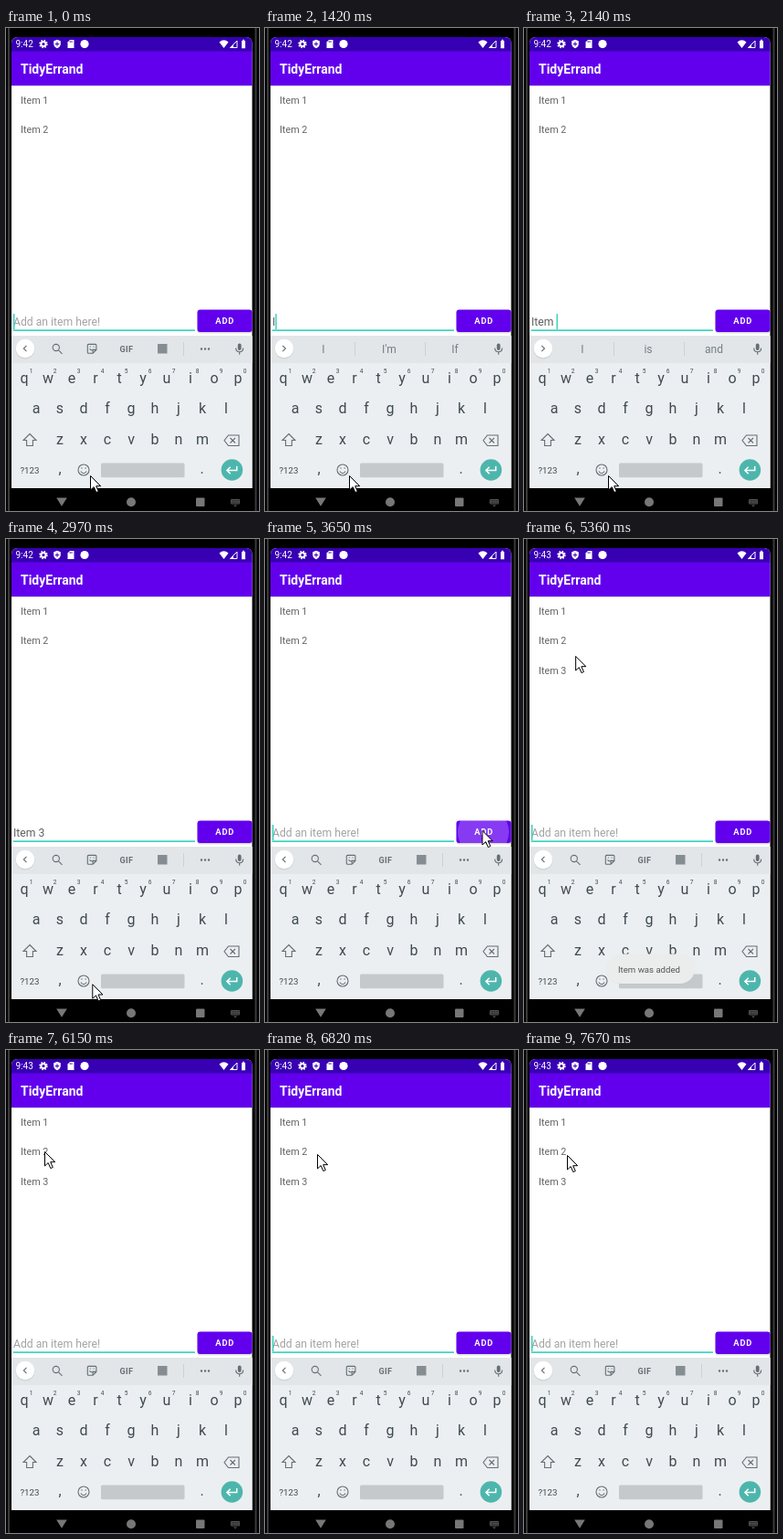
Write an HTML page that moves like this. It is 277x529 px and loops after 8 s.

```html
<!DOCTYPE html>
<html lang="en">
<head>
<meta charset="utf-8">
<style>
html, body { margin: 0; width: 100%; height: 100%; overflow: hidden; background: #000; }
svg { display: block; width: 100vw; height: 100vh; }
text { font-family: Roboto, Arial, sans-serif; white-space: pre; }
.mid { text-anchor: middle; }
.line { fill: none; stroke: #656f74; stroke-width: 1.1; }
.thin { fill: none; stroke: #cdd1d4; stroke-width: 1; }
</style>
</head>
<body>
<svg viewBox="0 0 277 529">
  <defs>
    <clipPath id="screen"><path d="M6 504V17q0-7 7-7H262.5q7 0 7 7V504z"/></clipPath>
    <clipPath id="buttonClip"><rect x="209.5" y="308.5" width="60" height="24.5" rx="3"/></clipPath>
  </defs>

  <!-- Phone and app -->
  <rect width="277" height="529"/>
  <path d="M3 0V529M273.5 0V529" stroke="#3a3a3a" stroke-width="2"/>
  <g clip-path="url(#screen)">
    <rect x="6" y="10" width="264" height="494" fill="#fff"/>
    <rect x="6" y="10" width="264" height="16" fill="#3700b3"/>
    <rect x="6" y="25.5" width="264" height="37.5" fill="#6200ee"/>
    <rect x="6" y="63" width="264" height="1" opacity=".1"/>
    <rect x="6" y="337" width="264" height="167" fill="#eceff1"/>
    <rect x="6" y="337" width="264" height="30" fill="#e2e6e9"/>
  </g>
  <text x="16" y="50" font-size="14" font-weight="700" fill="#fff">TidyErrand</text>

  <!-- Status bar -->
  <g fill="#fff">
    <text id="clock" x="10.5" y="21.3" font-size="10"></text>
    <circle cx="41" cy="17.5" r="2.6" fill="none" stroke="#fff" stroke-width="2"/>
    <circle cx="41" cy="17.5" r="4" fill="none" stroke="#fff" stroke-width="1.5" stroke-dasharray="1.6 1.54"/>
    <path d="M56 12.8l3.8 1.5v3q0 3.4-3.8 5q-3.8-1.6-3.8-5v-3z"/>
    <path d="M56 15.2v4.6M53.8 17.5h4.4" stroke="#3700b3"/>
    <path d="M70 13h4.5v9h-7v-6.5z"/>
    <path d="M70.2 14v2M72 14v2" stroke="#3700b3" stroke-width=".8"/>
    <circle cx="86" cy="17.5" r="4.6"/>
    <path d="M233.5 15.5q5-4.4 10 0l-5 6.5z"/>
    <path d="M253 14v7.5h-7.5z" fill="none" stroke="#fff"/>
    <path d="M249 18v3.5h-3.5z"/>
    <path d="M258 14h1v-1.2h2V14h1v8.2h-4z"/>
  </g>

  <g id="items" fill="#666"></g>

  <!-- Entry row -->
  <text id="entry" x="8" y="326" font-size="12.2"></text>
  <rect x="8" y="330.3" width="199" height="1.7" fill="#3fd3c2"/>
  <rect id="caret" y="313" width="1.5" height="17" fill="#3fd3c2"/>
  <rect x="209.5" y="309.5" width="60" height="25" rx="3" opacity=".13"/>
  <rect x="209.5" y="308.5" width="60" height="24.5" rx="3" fill="#6200ee"/>
  <circle id="ripple" cx="239" cy="321" fill="#fff" clip-path="url(#buttonClip)"/>
  <text x="239.8" y="324.4" class="mid" font-size="9.3" font-weight="700" letter-spacing=".9" fill="#fff">ADD</text>

  <!-- Keyboard -->
  <circle cx="21" cy="352" r="10.5" opacity=".08"/>
  <circle cx="21" cy="351" r="10.2" fill="#fff"/>
  <path id="chevron" class="line"/>
  <g id="tools">
    <circle class="line" cx="54.8" cy="350" r="3.6"/>
    <path class="line" d="M57.5 352.8l4 4"/>
    <path class="line" d="M90.3 346.4h7.6q1 0 1 1v5l-3.8 3.8h-4.8q-1 0-1-1v-7.8q0-1 1-1zM98.9 352.4h-3.8v3.8M91.5 351.2q1.4 2.3 3.4 1.3M91.8 349h1M95.6 349h1"/>
    <text x="132" y="354.5" class="mid" font-size="9" font-weight="700" letter-spacing=".4" fill="#656f74">GIF</text>
    <rect x="166" y="346" width="10.5" height="10.5" fill="#858d92"/>
    <path class="thin" d="M194.5 344v15"/>
    <path d="M214 351.5h.01M218 351.5h.01M222 351.5h.01" stroke="#656f74" stroke-width="2.4" stroke-linecap="round"/>
  </g>
  <g id="words" font-size="12" fill="#757e83" class="mid">
    <path class="thin" d="M98.5 344v15M175.5 344v15"/>
    <text x="64" y="356"></text><text x="136" y="356"></text><text x="208" y="356"></text>
  </g>
  <rect x="253.8" y="345.5" width="3.8" height="7.4" rx="1.9" fill="#656f74"/>
  <path class="line" d="M251.7 350.5q0 4.2 4 4.2t4-4.2M255.7 354.7v3"/>

  <g id="keys" class="mid" fill="#3f4b52"></g>
  <path class="line" d="M26 444.5l7 7h-3.6v6h-6.8v-6H19z"/>
  <path class="line" d="M243.5 446h11.5v11.5h-11.5l-4.5-5.75zM245.5 449l5.5 5.5M251 449l-5.5 5.5"/>
  <circle class="line" cx="85" cy="484" r="6"/>
  <path class="line" d="M81.8 485.5q3.2 4.4 6.4 0M82.2 482h1.5M86.4 482h1.5"/>
  <rect x="104" y="476.4" width="91.5" height="15.8" rx="1.5" fill="#c5c9cc"/>
  <circle cx="247.4" cy="484" r="11.8" fill="#4db6ac"/>
  <path d="M252.7 480v4.5h-10.5M245.7 480.7l-3.8 3.8 3.8 3.8" fill="none" stroke="#fff" stroke-width="1.5"/>

  <!-- Navigation bar -->
  <g fill="#777">
    <path d="M55.2 514.5h11.6l-5.8 9.3z"/>
    <circle cx="137" cy="519.3" r="5"/>
    <rect x="208" y="514.5" width="9.5" height="9.5" rx="1"/>
    <g fill="#555">
      <rect x="246" y="516" width="10" height="5.6" rx="1"/>
      <path d="M249 522.6h4l-2 1.8z"/>
    </g>
    <path d="M247.2 517.8h8M247.2 520h8" stroke="#000" stroke-dasharray="1 .8"/>
  </g>

  <g id="toast">
    <rect x="90" y="455" width="97" height="32.5" rx="16" opacity=".04"/>
    <rect x="90" y="454.5" width="97" height="32.5" rx="16" fill="#ebecec"/>
    <text x="103" y="474.5" font-size="9.6" fill="#555">Item was added</text>
  </g>
  <path id="pointer" d="M.5 .5V16L4.2 12.6 6.8 18.6 9.3 17.5 6.7 11.7H11.7Z" fill="#fff" stroke="#000"/>
</svg>

<script>
const LOOP = 8000;
const $ = id => document.getElementById(id);
const label = (s, x, y, size = 16) => `<text x="${x}" y="${y}" font-size="${size}">${s}</text>`;
const row = (letters, x, y) => [...letters].map((c, i) => label(c, x + 26 * i, y)).join('');

$('items').innerHTML = [1, 2, 3].map(n => label('Item ' + n, 16, 50.8 + 32.3 * n, 10.8)).join('');
$('keys').innerHTML = row('qwertyuiop', 20, 389) + row('asdfghjkl', 33, 422) + row('zxcvbnm', 59, 456) +
  [...'1234567890'].map((c, i) => label(c, 27.7 + 26 * i, 378, 6.6)).join('') +
  label('?123', 26, 487.5, 9.7) + label(',', 59, 488) + label('.', 214.5, 488);

// [time, entered text, suggestions]; no list shows the tools
const typing = [
  [0, ''],
  [1420, 'I', ['I', "I'm", 'If']],
  [1550, 'It', ['It', "It's", 'Its']],
  [1690, 'Ite', ['Ite', 'Item', 'Items']],
  [1840, 'Item', ['Items', 'Item', 'Itemized']],
  [2140, 'Item ', ['I', 'is', 'and']],
  [2420, 'Item 3', ['', '', '']],
  [2570, 'Item 3'],
  [3600, '']
];
const blinks = [130, 700, 1270, 1420, 2970, 3500, 3960, 4110, 4570, 5150, 5750, 6450, 7090, 7670];
// [time, x, y]
const path = [
  [0, 92, 490], [2930, 92, 490], [3480, 237.5, 319], [3800, 237.5, 319], [3960, 241.5, 323],
  [4700, 241.5, 323], [5500, 40, 111], [6150, 42, 111], [6420, 42, 111], [6800, 57, 114],
  [7090, 58, 111], [7670, 47, 115], [LOOP, 47, 115]
];

const ramp = (t, a, b) => Math.min(1, Math.max(0, (t - a) / (b - a)));
const show = (el, on) => el.style.display = on ? '' : 'none';

function pointerAt(t) {
  const i = path.findIndex(p => p[0] > t);
  const [t0, x0, y0] = path[i - 1], [t1, x1, y1] = path[i];
  const k = ramp(t, t0, t1), e = k * k * (3 - 2 * k);
  return [x0 + (x1 - x0) * e, y0 + (y1 - y0) * e];
}

function draw(t) {
  const [, text, words] = typing.filter(s => s[0] <= t).pop();
  const entry = $('entry');
  entry.textContent = text || 'Add an item here!';
  entry.setAttribute('fill', text ? '#5f5f5f' : '#a3a3a3');
  $('caret').setAttribute('x', 8 + (text ? entry.getComputedTextLength() : 0));
  show($('caret'), blinks.filter(b => b <= t).length % 2 === 0);

  show($('tools'), !words);
  show($('words'), words);
  $('chevron').setAttribute('d', words ? 'M19.3 347.8l3.2 3.2-3.2 3.2' : 'M22.5 347.8l-3.2 3.2 3.2 3.2');
  if (words) $('words').querySelectorAll('text').forEach((el, i) => el.textContent = words[i]);

  show($('items').lastChild, t >= 3800);
  $('clock').textContent = t < 4110 ? '9:42' : '9:43';
  $('ripple').setAttribute('r', 28 * ramp(t, 3500, 3650) + 5 * ramp(t, 3660, 3800));
  $('ripple').setAttribute('opacity', .23 * (1 - ramp(t, 3780, 3960)));
  $('toast').setAttribute('opacity', ramp(t, 4050, 4130) * (1 - ramp(t, 5700, 6100)));
  $('pointer').setAttribute('transform', `translate(${pointerAt(t)})`);
}

function frame() {
  draw(performance.now() % LOOP);
  requestAnimationFrame(frame);
}
frame();
</script>
</body>
</html>
```
